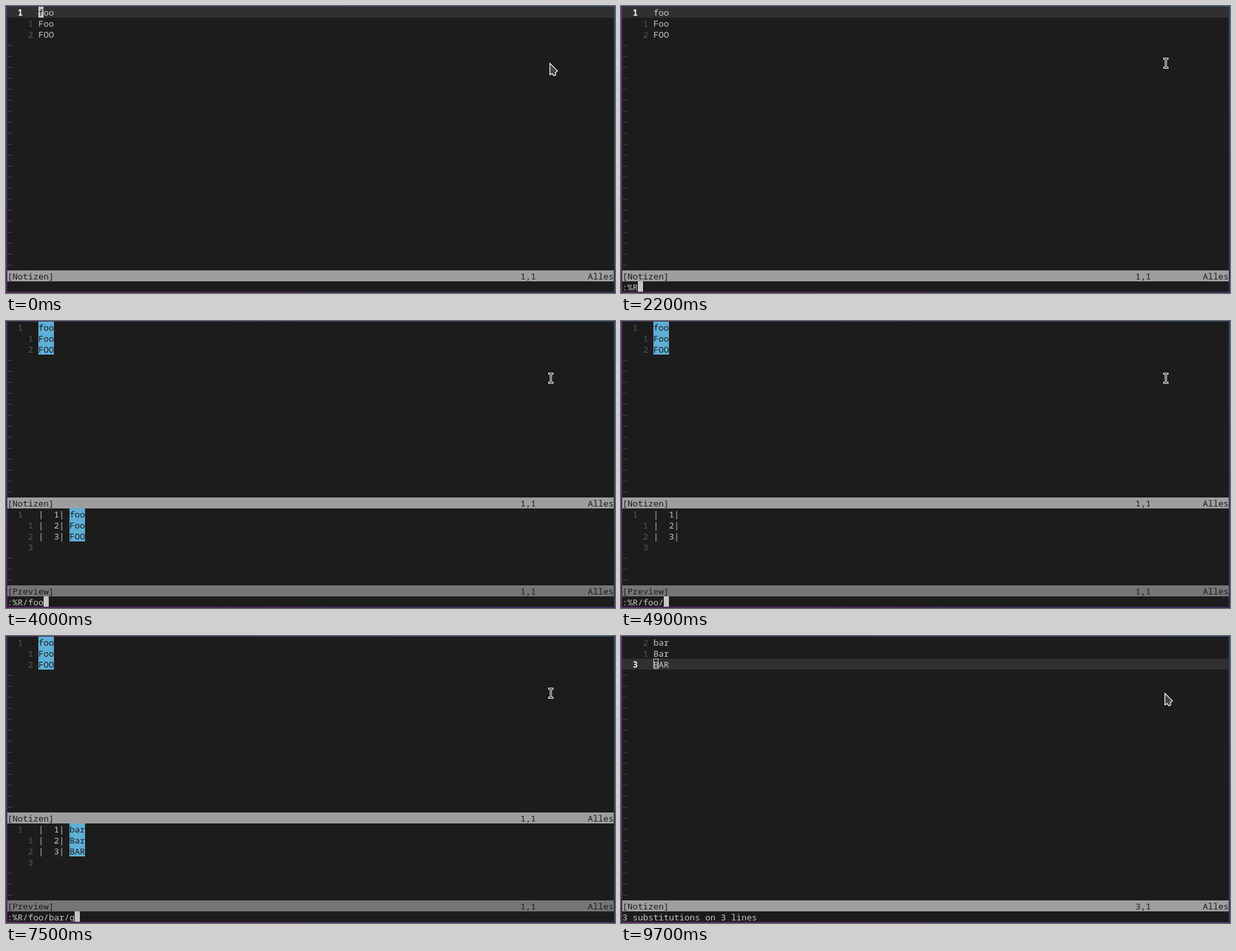
Animation of 940 by 444 pixels, one loop 9.8 s. Source, as an HTML page with a canvas:

```html
<!DOCTYPE html>
<html lang="en">
<head>
<meta charset="utf-8">
<title>Substitute with preview</title>
<style>
html, body { margin: 0; width: 100%; height: 100%; overflow: hidden; background: #1c1c1c; }
canvas { display: block; }
</style>
</head>
<body>
<canvas id="stage" width="940" height="444"></canvas>
<script>
const ctx = document.getElementById('stage').getContext('2d');
const LOOP = 9800, CELL = 8, ROW = 17, TEXT_COL = 6, PREVIEW_ROW = 17, STATUS_ROW = 24, CMD_ROW = 25;
const BG = '#1c1c1c', FG = '#c6c6c6', DIM = '#585858', MATCH = '#5fafd7';
const FONT = '13.333px "Noto Sans Mono", "DejaVu Sans Mono", monospace';

const COMMAND = ':%R/foo/bar/g';
const KEY_TIMES = [900, 1700, 2200, 3100, 3500, 3800, 4000, 4900, 5600, 5800, 5900, 6900, 7500];
const ENTER = 8300, BLUR = 9700;
const BEFORE = ['foo', 'Foo', 'FOO'], AFTER = ['bar', 'Bar', 'BAR'];

const colX = col => 2 + col * CELL;
const rowY = row => 1 + row * ROW;

function fill(col, row, width, color) {
  ctx.fillStyle = color;
  ctx.fillRect(colX(col), rowY(row), width * CELL, ROW);
}

function print(str, col, row, color = FG, bold = false) {
  ctx.font = (bold ? 'bold ' : '') + FONT;
  ctx.fillStyle = color;
  ctx.fillText(str, colX(col), rowY(row) + 14);
}

function mark(str, col, row, color = MATCH) {
  fill(col, row, str.length, color);
  print(str, col, row, BG);
}

function tildes(from, to) {
  for (let row = from; row < to; row++) print('~', 0, row, DIM);
}

function statusLine(row, name, position, color) {
  fill(0, row, 117, color);
  print(name, 0, row, BG);
  print(position, 99, row, BG);
  print('Alles', 112, row, BG);
}

// Relative numbers; the current line shows its absolute number further left.
function lineNumber(line, current, top, focused) {
  if (line !== current) return print(String(Math.abs(line - current)), 4, top + line, DIM);
  print(String(line + 1), 2, top + line, focused ? '#eeeeee' : DIM, focused);
}

function buffer(lines, current, matched, focused, bottom) {
  if (focused) fill(0, current, 117, '#303030');
  lines.forEach((line, i) => {
    lineNumber(i, current, 0, focused);
    print(line, TEXT_COL, i);
    mark(line.slice(0, matched), TEXT_COL, i);
  });
  tildes(lines.length, bottom);
}

function preview(typed) {
  const [, pattern = '', replacement] = typed.split('/');
  const words = replacement === undefined ? BEFORE : AFTER;
  const shown = (replacement ?? pattern).length;
  lineNumber(0, 0, PREVIEW_ROW, false);
  if (pattern) {
    words.forEach((word, i) => {
      const row = PREVIEW_ROW + i;
      print(`|  ${i + 1}| `, TEXT_COL, row);
      if (replacement === undefined) print(word, 12, row);
      mark(word.slice(0, shown), 12, row);
      lineNumber(i + 1, 0, PREVIEW_ROW, false);
    });
  }
  tildes(PREVIEW_ROW + (pattern ? 4 : 1), STATUS_ROW);
  statusLine(STATUS_ROW, '[Preview]', pattern ? '1,1' : '0,0-1', '#767676');
  return pattern.length;
}

function gradientRect(x, y, w, h, from, to) {
  const g = ctx.createLinearGradient(x, y, w > h ? x + w : x, w > h ? y : y + h);
  g.addColorStop(0, from);
  g.addColorStop(1, to);
  ctx.fillStyle = g;
  ctx.fillRect(x, y, w, h);
}

function frameEdges() {
  gradientRect(0, 0, 940, 1, '#4b2f66', '#2c4a80');
  gradientRect(0, 442, 940, 2, '#55285c', '#35305f');
  gradientRect(0, 0, 2, 444, '#52306c', '#55285c');
  gradientRect(938, 0, 2, 444, '#2c4272', '#35305f');
}

function arrowPointer() {
  ctx.fillStyle = '#444444';
  ctx.strokeStyle = '#ffffff';
  ctx.lineWidth = 1.2;
  ctx.stroke(new Path2D());
  const arrow = new Path2D('M839.5 88.8L851.3 100.4L847.7 103.2L848.6 106.6L845.6 108L843.2 104.6L839.5 106.6Z');
  ctx.fill(arrow);
  ctx.stroke(arrow);
}

function beamPointer() {
  const beam = new Path2D('M838.5 81.5H843.5M841 81.5V95.5M838.5 95.5H843.5');
  ctx.lineCap = 'square';
  for (const [color, width] of [['#ffffff', 3], ['#111111', 1]]) {
    ctx.strokeStyle = color;
    ctx.lineWidth = width;
    ctx.stroke(beam);
  }
  ctx.lineCap = 'butt';
}

function draw(t) {
  const done = t >= ENTER;
  const typed = done ? '' : COMMAND.slice(0, KEY_TIMES.filter(k => k <= t).length);
  const split = typed.includes('/');
  const lines = done ? AFTER : BEFORE;
  const current = done ? 2 : 0;

  ctx.fillStyle = BG;
  ctx.fillRect(0, 0, 940, 444);

  const matched = split ? preview(typed) : 0;
  const bottom = split ? PREVIEW_ROW - 1 : STATUS_ROW;
  buffer(lines, current, matched, !split, bottom);
  statusLine(bottom, '[Notizen]', `${current + 1},1`, '#9e9e9e');

  if (typed) {
    print(typed, 0, CMD_ROW);
    fill(typed.length, CMD_ROW, 1, FG);
  } else if (t < BLUR) {
    mark(lines[current][0], TEXT_COL, current, FG);
  } else {
    ctx.strokeStyle = FG;
    ctx.lineWidth = 1;
    ctx.strokeRect(colX(TEXT_COL) + .5, rowY(current) + .5, CELL - 1, ROW - 2);
  }
  if (done) print('3 substitutions on 3 lines', 0, CMD_ROW);

  frameEdges();
  if (typed) beamPointer(); else arrowPointer();
}

const start = performance.now();
function tick() {
  draw((performance.now() - start) % LOOP);
  requestAnimationFrame(tick);
}
tick();
</script>
</body>
</html>
```
